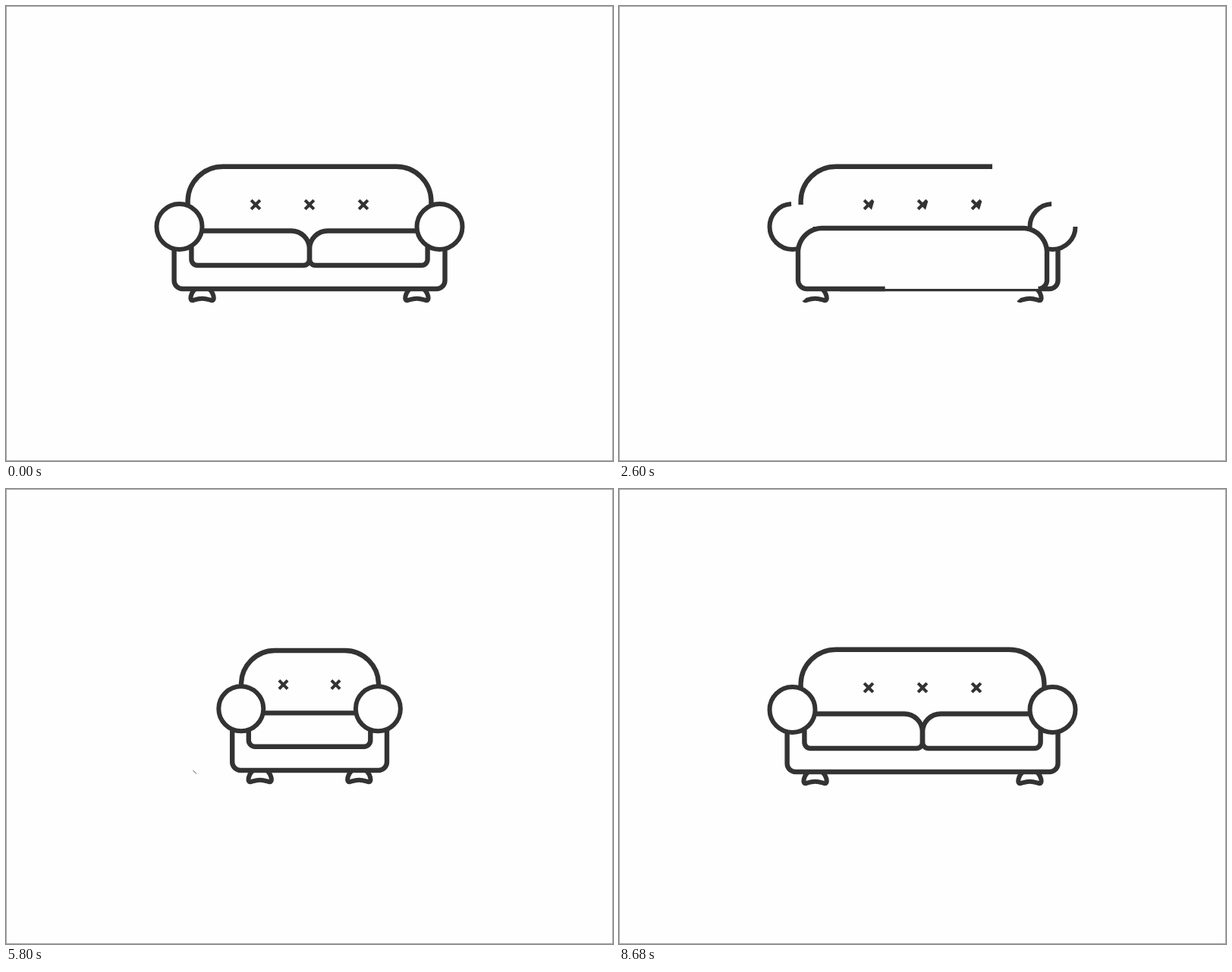
An HTML page that plays this animation: 800 px wide and 600 px high, repeating every 9640 ms.

```html
<!DOCTYPE html>
<html lang="en">
<head>
<meta charset="utf-8">
<title>Sofa line drawing</title>
<style>
  html, body { margin: 0; width: 100%; height: 100%; overflow: hidden; background: #fefefe; }
  svg { display: block; width: 100vw; height: 100vh; }
  path { fill: none; stroke: #333; stroke-width: 6.4; }
  path.round { stroke-width: 6; }
  path.panel { fill: #fefefe; }
  path.cross { fill: #333; stroke: none; }
  path.nick { stroke-width: .9; }
  .frame { fill: none; stroke: #a4a4a4; }
</style>
</head>
<body>
<svg id="stage" viewBox="0 0 800 600">
  <rect class="frame" x=".5" y=".5" width="799" height="599"/>
  <path class="nick" d="M246.6 371.2L251 375.6"/>
</svg>
<script>
const LOOP = 9640, STEP = 40, SPAN = 960;
const NS = 'http://www.w3.org/2000/svg';
const stage = document.getElementById('stage');

const circle = (x, y, r) =>
  ['round', `M${x + r} ${y}A${r} ${r} 0 0 1 ${x - r} ${y}A${r} ${r} 0 0 1 ${x + r} ${y}Z`];

// Open U, from its top right end clockwise to its top left end
const tub = (l, r, top, bottom, c) =>
  ['', `M${r} ${top}V${bottom - c}A${c} ${c} 0 0 1 ${r - c} ${bottom}` +
       `H${l + c}A${c} ${c} 0 0 1 ${l} ${bottom - c}V${top}`];

// Arch, from its bottom left end clockwise
const arch = (l, r, top, end, c) =>
  ['', `M${l} ${end}V${top + c}A${c} ${c} 0 0 1 ${l + c} ${top}` +
       `H${r - c}A${c} ${c} 0 0 1 ${r} ${top + c}V${end}`];

const foot = (x, y) => {
  const at = (dx, dy) => `${x + dx} ${y + dy} `;
  return ['round', `M${at(9.5, 0)}C${at(12.7, 3.2)}${at(15.2, 8)}${at(15.2, 12.3)}` +
    `Q${at(15.2, 15.5)}${at(11.8, 14.7)}C${at(8, 13.6)}${at(4.5, 12.4)}${at(0, 12.4)}` +
    `C${at(-4.5, 12.4)}${at(-8, 13.6)}${at(-11.8, 14.7)}Q${at(-15.2, 15.5)}${at(-15.2, 12.3)}` +
    `C${at(-15.2, 8)}${at(-12.7, 3.2)}${at(-9.5, 0)}`];
};

// Outline of an x, counterclockwise from the right tip
const cross = (x, y, a, b) => {
  const pts = [];
  for (let i = 0, u = 1, v = 0; i < 4; i++, [u, v] = [v, -u])
    for (const [p, q] of [[a, -b], [b, -a], [0, b - a]])
      pts.push(`${x + p * u - q * v} ${y + p * v + q * u}`);
  return ['cross', `M${pts.join('L')}Z`];
};

const sofa = [
  foot(258.6, 373.3), foot(541.4, 373.3),
  tub(221.6, 578.5, 321, 373, 11),
  arch(239.6, 560.4, 211.8, 262, 46),
  ...[329, 400, 471].map(x => cross(x, 262, 7.3, 4.4))
];
const arms = [circle(228.5, 291, 30), circle(571.5, 291, 30)];

const cushions = [
  ['', 'M259 296.5H376A24 24 0 0 1 400 320.5V334A8 8 0 0 1 392 342H252.4A8 8 0 0 1 244.4 334V318'],
  ['', 'M555.6 318V334A8 8 0 0 1 547.6 342H408A8 8 0 0 1 400 334V320.5A24 24 0 0 1 424 296.5H541']
];

const panel = ['panel', 'M552.5 373A11.5 11.5 0 0 0 564 361.5V325A32 32 0 0 0 532 293' +
  'H268A32 32 0 0 0 236 325V361.5A11.5 11.5 0 0 0 247.5 373Z'];

const chair = [
  foot(334.7, 371.3), foot(465.3, 371.3),
  tub(298.2, 502, 318, 371, 11),
  arch(310, 491, 213, 258, 44.5),
  cross(365.5, 258, 7, 4.2), cross(434.5, 258, 7, 4.2),
  ['', 'M339.5 295.4H461'],
  tub(319.8, 480.3, 318, 339.7, 8.5),
  circle(309.8, 289.8, 29.5), circle(490.4, 289.8, 29.5)
];

function build(shapes) {
  return shapes.map(([kind, d]) => {
    const el = document.createElementNS(NS, 'path');
    el.setAttribute('class', kind);
    el.setAttribute('d', d);
    stage.append(el);
    return { el, d, len: el.getTotalLength(), filled: kind === 'panel' || kind === 'cross',
             ruler: el.cloneNode() };
  });
}

// Show the first part p of a shape; fills close along the chord
function trim({ el, d, len, filled, ruler }, p) {
  el.style.display = p > 0 ? '' : 'none';
  if (p <= 0) return;
  if (!filled) {
    el.style.strokeDasharray = p < 1 ? `${len * p} ${len * 2}` : 'none';
    return;
  }
  if (p >= 1) return el.setAttribute('d', d);
  const n = Math.ceil(len * p * (len < 100 ? 4 : 1)) + 1;
  const pts = [];
  for (let i = 0; i <= n; i++) {
    const q = ruler.getPointAtLength(len * p * i / n);
    pts.push(`${q.x.toFixed(2)} ${q.y.toFixed(2)}`);
  }
  el.setAttribute('d', 'M' + pts.join('L'));
}

const ease = (t, start) => {
  const x = Math.min(1, Math.max(0, (t - start) / SPAN));
  return x * x * (3 - 2 * x);
};

const scenes = [
  { parts: build([...sofa, ...cushions, ...arms]), level: t => 1 - ease(t, 40) + ease(t, 7720) },
  { parts: build([...sofa, ...arms, panel]), level: t => ease(t, 1960) - ease(t, 3880) },
  { parts: build(chair), level: t => ease(t, 4840) - ease(t, 6760) }
];

const begin = performance.now();
function draw(now) {
  const time = Math.max(0, now - begin) % LOOP;
  const t = Math.floor(time / STEP) * STEP;
  for (const s of scenes) {
    const p = s.level(t);
    if (p === s.shown) continue;
    s.shown = p;
    s.parts.forEach(part => trim(part, p));
  }
  requestAnimationFrame(draw);
}
draw(begin);
</script>
</body>
</html>
```
